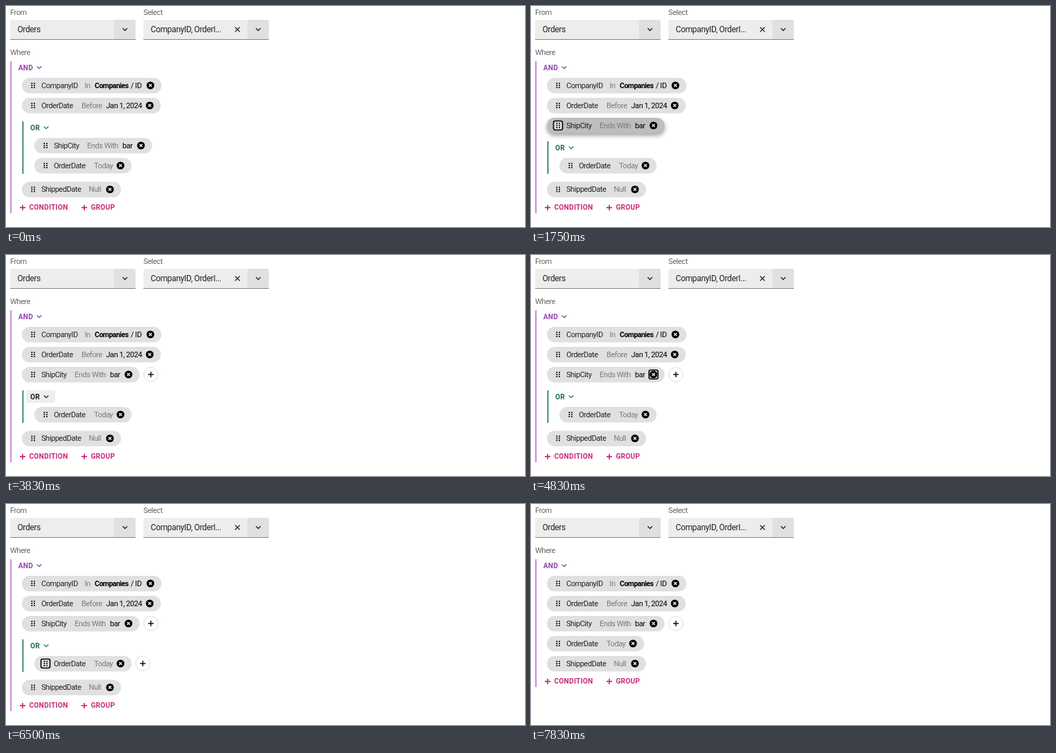
Animation, 749 px wide and 320 px high, one loop 8 s. Source, as an HTML page:

```html
<!DOCTYPE html>
<html lang="en">
<head>
<meta charset="utf-8">
<title>Query builder</title>
<style>
  html, body { margin: 0; width: 100%; height: 100%; overflow: hidden; background: #fff; }
  svg { display: block; }
  text { font: 11px Roboto, "Open Sans", sans-serif; letter-spacing: -.45px; fill: #222; white-space: pre; }
  .label { fill: #666; }
  .field { font-size: 12px; letter-spacing: -.34px; }
  .op { fill: #7b7b7b; }
  .strong { font-weight: 700; font-size: 10.5px; letter-spacing: -.5px; fill: #000; }
  .button { font-weight: 600; font-size: 10.2px; letter-spacing: .25px; }
  .line { fill: none; }
  .lifted { filter: drop-shadow(0 3px 3px rgba(0, 0, 0, .38)); }
</style>
</head>
<body>
<svg id="stage" width="749" height="320" viewBox="0 0 749 320"></svg>
<script>
const LOOP = 8000;
const PURPLE = '#9344ad', TEAL = '#1d7059', PINK = '#c92c78';

// Offsets are measured from the left edge of each chip.
const CHIPS = {
  company: { name: 'CompanyID', op: ['In', 90.5], value: ['Companies', 105, 'strong'], extra: ['/ ID', 157], close: 185.4 },
  before: { name: 'OrderDate', op: ['Before', 86], value: ['Jan 1, 2024', 121.5], close: 184.4 },
  city: { name: 'ShipCity', op: ['Ends With', 76], value: ['bar', 127], close: 153.8 },
  today: { name: 'OrderDate', op: ['Today', 86], close: 124.2 },
  shipped: { name: 'ShippedDate', op: ['Null', 96.5], close: 127 }
};

const NESTED = { city: [41, 202], today: [41, 231], shipped: [23, 265.5], or: 176, bottom: 300 };
const CITY_OUT = { ...NESTED, city: [23, 173], or: 205 };
const BOTH_OUT = { ...CITY_OUT, today: [23, 202], or: 234 };
const FLAT = { ...BOTH_OUT, shipped: [23, 231], or: 0, bottom: 265 };

// [start in ms, layout, focused part, chips with an add button]
const STEPS = [
  [0, NESTED, '', []],
  [330, NESTED, 'or', []],
  [670, NESTED, 'city chip or', ['city']],
  [1000, NESTED, 'city handle', ['city']],
  [1330, CITY_OUT, 'city handle lifted', []],
  [2500, CITY_OUT, 'city handle', ['city']],
  [3000, CITY_OUT, 'city close', ['city']],
  [3330, CITY_OUT, '', ['city']],
  [3670, CITY_OUT, 'or dim', ['city']],
  [4170, CITY_OUT, '', ['city']],
  [4670, CITY_OUT, 'city close', ['city']],
  [5170, CITY_OUT, '', ['city']],
  [5500, CITY_OUT, 'or', ['city']],
  [5830, CITY_OUT, 'today chip', ['city', 'today']],
  [6170, CITY_OUT, 'today handle', ['city', 'today']],
  [6920, BOTH_OUT, 'today handle lifted', ['city']],
  [7500, FLAT, '', ['city']]
];

const text = (x, y, s, cls = '', fill = '') =>
  `<text x="${x}" y="${y}" class="${cls}"${fill && ` style="fill:${fill}"`}>${s}</text>`;
const rect = (x, y, w, h, fill, r = 0, more = '') =>
  `<rect x="${x}" y="${y}" width="${w}" height="${h}" rx="${r}" fill="${fill}" ${more}/>`;
const path = (d, color, width = 1.3) =>
  `<path class="line" d="${d}" stroke="${color}" stroke-width="${width}"/>`;
const chevron = (x, y, color) => path(`M${x - 3.3} ${y - 1.8}l3.3 3.3 3.3-3.3`, color);
const cross = (x, y, r, color, width) =>
  path(`M${x - r} ${y - r}l${2 * r} ${2 * r}m0 ${-2 * r}l${-2 * r} ${2 * r}`, color, width);
const plus = (x, y, r, color, width) =>
  path(`M${x - r} ${y}h${2 * r}M${x} ${y - r}v${2 * r}`, color, width);
const ring = (x, y, fill) =>
  rect(x - 6.5, y - 6.5, 13, 13, fill, 2.5, 'stroke="#000" stroke-width="1.6"');

function handle(x, y) {
  let dots = '';
  for (let i = 0; i < 6; i++)
    dots += rect(x - 2.6 + (i % 2) * 3.6, y - 3.9 + (i >> 1) * 3, 1.9, 1.9, '#111', .4);
  return dots;
}

function chip(id, [x, y], focus = '', add = false) {
  const { name, op, value, extra, close } = CHIPS[id];
  const on = part => focus.startsWith(id + ' ') && focus.includes(part);
  const fill = on('chip') ? '#9e9e9e' : on('lifted') ? '#bdbdbd' : '#e0e0e0';
  const base = y + 3.6, cx = x + close;
  let out = rect(x, y - 11, close + 16, 22.5, fill, 11.2, on('lifted') ? 'class="lifted"' : '');
  if (on('handle')) out += ring(x + 16, y, '#e0e0e0');
  out += handle(x + 16, y) + text(x + 28, base, name);
  out += text(x + op[1], base, op[0], 'op', on('chip') ? '#484848' : '');
  for (const part of [value, extra])
    if (part) out += text(x + part[1], base, part[0], part[2], '#000');
  if (on('close')) out += ring(cx, y, '#e0e0e0');
  out += `<circle cx="${cx}" cy="${y}" r="5.6"/>` + cross(cx, y, 2, '#fff', 1.3);
  if (add) {
    const px = cx + 32.3;
    out += `<circle cx="${px}" cy="${y}" r="10.3" fill="#fff" stroke="#dedede"/>` + plus(px, y, 4, '#111', 1.5);
  }
  return out;
}

function select(x, label, value) {
  return text(x, 13, label, 'label') +
    rect(x, 20, 181, 28.5, '#ededed', 2) + rect(x + 150, 20, 31, 28.5, '#e0e0e0', 2) +
    rect(x, 48, 181, 1, '#858585') +
    text(x + 10.4, 38.2, value, 'field') + chevron(x + 165.7, 34, '#222');
}

function action(x, y, label) {
  return plus(x + 4, y + .3, 4, PINK, 1.7) + text(x + 13.4, y + 3.7, label, 'button', PINK);
}

const fixed = select(6, 'From', 'Orders') + select(198.3, 'Select', 'CompanyID, OrderI...') +
  cross(334, 34, 3.4, '#111', 1.3) + text(6, 71, 'Where', 'label') +
  text(17.7, 92.7, 'AND', 'button', PURPLE) + chevron(48, 89.2, '#70417f') +
  chip('company', [23, 115]) + chip('before', [23, 144]);

function group(y, focus) {
  if (!y) return '';
  const active = /\bor\b/.test(focus), dim = focus.includes('dim');
  const color = dim ? '#222' : TEAL;
  return rect(23.5, y - 9, 1.8, 252 - y, '#2b7d65') +
    (active ? rect(29, y - 9, 42, 18, dim ? '#eeeeee' : '#d3e5e0', 2) : '') +
    text(35, y + 3.7, 'OR', 'button', color) + chevron(58, y + .2, color);
}

function scene([, layout, focus, adds]) {
  const movable = ['city', 'today', 'shipped'];
  return fixed + rect(6.3, 80, 1.6, layout.bottom - 80, '#bd70d4') + group(layout.or, focus) +
    movable.map(id => chip(id, layout[id], focus, adds.includes(id))).join('') +
    action(20, layout.bottom - 8.4, 'CONDITION') + action(109, layout.bottom - 8.4, 'GROUP');
}

const stage = document.getElementById('stage');
const start = performance.now();
let shown;

function draw() {
  const t = (performance.now() - start) % LOOP;
  const step = STEPS.findLast(([at]) => at <= t);
  if (step !== shown) stage.innerHTML = scene(shown = step);
  requestAnimationFrame(draw);
}
draw();
</script>
</body>
</html>
```
